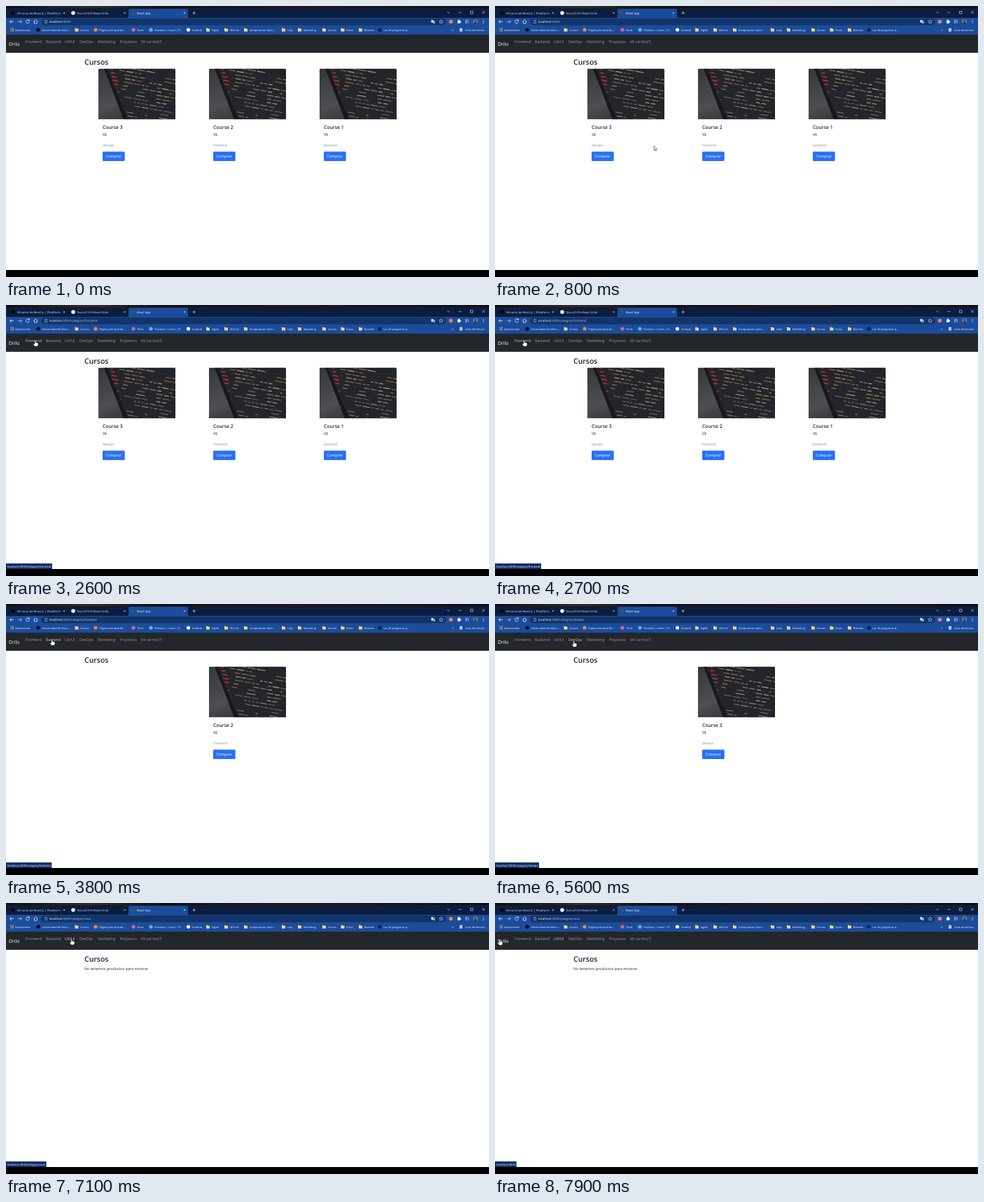
Write an HTML page that moves like this. It is 690 px wide and 388 px high and loops after 8000 ms.

```html
<!DOCTYPE html>
<html lang="es">
<head>
<meta charset="utf-8">
<title>React App</title>
<style>
  html, body { margin: 0; width: 100%; height: 100%; overflow: hidden; background: #fff; }
  svg { display: block; width: 690px; height: 388px; }
  text { font-family: "Open Sans", "Noto Sans", sans-serif; text-rendering: geometricPrecision; white-space: pre; }
</style>
</head>
<body>
<svg id="stage" viewBox="0 0 690 388" xmlns="http://www.w3.org/2000/svg"></svg>
<script>
const LOOP = 8000, STEP = 100;
const stage = document.getElementById('stage');

const rect = (x, y, w, h, fill, extra = '') =>
  `<rect x="${x}" y="${y}" width="${w}" height="${h}" fill="${fill}" ${extra}/>`;
const dot = (x, y, r, fill) => `<circle cx="${x}" cy="${y}" r="${r}" fill="${fill}"/>`;
const line = (d, color = '#e4ebf7', w = .8) =>
  `<path d="${d}" fill="none" stroke="${color}" stroke-width="${w}"/>`;
const text = (x, y, size, fill, str, extra = '') =>
  `<text x="${x}" y="${y}" font-size="${size}" fill="${fill}" ${extra}>${str}</text>`;
const cross = (x, y, r) =>
  line(`M${x - r} ${y - r}l${2 * r} ${2 * r}m0 ${-2 * r}l${-2 * r} ${2 * r}`, '#dfe6f2', .6);

// Blurred photo of code on a tilted screen, 110 x 73
function photo() {
  let seed = 7;
  const rnd = () => (seed = (seed * 16807) % 2147483647) / 2147483647;
  const tones = ['#8d8f92', '#a58e4d', '#b6b4ab', '#97713a', '#6f7277'];
  let code = '';
  for (let row = -5; row < 15; row++) {
    const y = row * 5.2, left = 17 + row * 1.9;
    code += rect(left, y, 3 + rnd() * 6, 1.6, '#c23a35');
    for (let x = left + 11 + rnd() * 9; x < 112; x += 2) {
      const w = 3 + rnd() * 10;
      if (rnd() < .74) code += rect(x, y, w, 1.2, tones[Math.floor(rnd() * tones.length)]);
      x += w;
    }
  }
  return `<g id="photo" clip-path="url(#crop)">
    ${rect(0, 0, 110, 73, 'url(#desk)')}
    <path d="M11 0H110V73H41Z" fill="#24242b"/>
    <path d="M8 0H12L42 73H36Z" fill="#17181c"/>
    <g clip-path="url(#screen)"><g transform="rotate(10 20 0)" opacity=".85">${code}</g></g>
  </g>`;
}

function browser() {
  const frame = rect(0, 0, 690, 17, '#0b1d3f') + rect(0, 0, 690, 3, 'url(#edge)') +
    `<path d="M173 17q2 0 2-2V6q0-2 2-2h81q2 0 2 2v9q0 2 2 2z" fill="#1b4c9b"/>` +
    rect(0, 17, 690, 24, '#1b4c9b') + rect(50, 18, 579, 9.4, '#123468', 'rx="4.7"');

  const tabs = dot(10, 10, 2.8, '#080808') + dot(96, 10, 2.8, '#f3f5f8') + dot(181.5, 10, 2.6, '#3d5366') +
    text(16, 11.7, 4.15, '#dce4f2', 'Mi curso de React Js | Plataform') +
    text(101, 11.7, 4.15, '#dce4f2', 'Tovru27/CH-React-Drilo') +
    text(187, 11.7, 4.15, '#fff', 'React App') +
    [83, 169.5, 255].map(x => cross(x, 10, 1.2)).join('') +
    line('M266.5 10h4.4m-2.2-2.2v4.4', '#dfe6f2', .65) +
    line('M630.5 8.5l1.7 1.6 1.7-1.6', '#dfe6f2', .6) + line('M646.5 9.3h4', '#dfe6f2', .6) +
    line('M663.5 7.5h3.5v3.5h-3.5z', '#dfe6f2', .6) + cross(682, 9.2, 1.8);

  const tools = line('M11 22.5H5.5m2.4-2.4l-2.4 2.4 2.4 2.4') +
    line('M17 22.5h5.5m-2.4-2.4l2.4 2.4-2.4 2.4', '#aebfdd') +
    line('M33 20.8a2.5 2.5 0 1 0 .4 2.4M33.4 19.4v2h-2') +
    line('M39.4 22.4l2.9-2.6 2.9 2.6M40.4 21.8v3.2h3.8v-3.2') +
    line('M55.8 20.4h2.6v4.2h-2.6z', '#b9c7df', .6) +
    rect(607.5, 20, 3, 3.8, '#dfe6f2') + rect(609.8, 21.2, 3, 3.8, '#8fa6cf') +
    line('M621.6 19.6l.8 1.9 2 .2-1.5 1.3.5 2-1.8-1.1-1.8 1.1.5-2-1.5-1.3 2-.2z', '#dfe6f2', .55) +
    dot(635.5, 22.4, 2.7, '#e8805c') +
    rect(645, 20.7, 4.1, 4.1, '#f2f5fa', 'rx=".5"') + dot(646.9, 20.5, 1, '#f2f5fa') + dot(649.3, 22.7, .9, '#f2f5fa') +
    line('M656 20.8h4.8m-4.8 1.7h3.2m-3.2 1.7h2.5M660.6 22v2.6', '#dfe6f2', .7) +
    dot(670.7, 22.4, 3.3, '#77838c') + dot(670.7, 21.4, 1.2, '#22262d') +
    '<path d="M668.5 24.8q2.2-3.8 4.4 0q-2.2 1.8-4.4 0" fill="#22262d"/>' +
    [20.5, 22.4, 24.3].map(y => dot(682, y, .55, '#fff')).join('');

  // [icon x, label, icon colour]; no colour means a folder
  const marks = [
    [46, 'Universidad de Moru...', '#0b0b10'], [101, 'Cursos'], [128, 'Página principal de...', '#e78b3c'],
    [182, 'Tivok', '#d9628a'], [207, 'Products | Learn | P...', '#55b5e8'], [260.5, 'Codnub', '#f3f5f8'],
    [288.5, 'Inglés'], [314.5, 'ADS.txt'], [342.5, 'Computacion Aplic...'], [396.5, 'ruby'],
    [419.5, 'Marketing'], [454.5, 'Cursos'], [481, 'Foros'], [506.5, 'Bocetos'],
    [534, 'Las 36 preguntas q...', '#10203e']
  ].map(([x, label, color]) =>
    (color ? dot(x, 34, 2.6, color)
      : `<path d="M${x - 2.5} 31.8h2l.7.8h2.3v3.8h-5z" fill="#f6d67a"/>`) +
    text(x + 5.2, 35.5, 3.85, '#edf2fb', label)).join('');

  let apps = '';
  for (let i = 0; i < 9; i++)
    apps += rect(6 + i % 3 * 1.8, 31.6 + Math.floor(i / 3) * 1.8, 1.2, 1.2, ['#e96a5c', '#7cc08a', '#e9c65c'][i % 3]);
  return frame + tabs + tools + apps + text(13, 35.5, 3.85, '#edf2fb', 'Aplicaciones') + marks +
    text(637, 35.5, 5, '#edf2fb', '»') + rect(648, 31.8, 4, 4.6, '#dfe6f2') +
    line('M648.8 33.2h2.4m-2.4 1.5h2.4', '#1b4c9b', .5) +
    text(656, 35.5, 3.95, '#edf2fb', 'Lista de lectura');
}

const links = [
  ['Frontend', 28, 'frontend'], ['Backend', 57, 'backend'], ['UX/UI', 84, 'uiux'], ['DevOps', 105, 'devops'],
  ['Marketing', 131, 'marketing'], ['Proyectos', 162.5, 'proyectos'], ['Mi carrito(?)', 193, 'cart']
];

const card = (x, title, kind, id) => `<g id="${id}" transform="translate(${x} 89.5)">
  <use href="#photo"/>
  ${text(6, 86, 6.8, '#212529', title, 'font-weight="600"')}
  ${text(6, 96.3, 5.3, '#212529', '9$')}
  ${text(6, 111, 4.8, '#85898d', kind)}
  ${rect(6, 119, 31.7, 13.6, '#2970f6', 'rx="1.4"')}
  ${text(10.6, 127.8, 5.45, '#fff', 'Comprar')}</g>`;

stage.innerHTML = `<defs>
    <clipPath id="crop"><path d="M0 73V1.2Q0 0 1.2 0H108.8Q110 0 110 1.2V73Z"/></clipPath>
    <clipPath id="screen"><path d="M13 0H110V73H43Z"/></clipPath>
    <linearGradient id="desk" x2=".6" y2="1"><stop stop-color="#35373b"/><stop offset=".6" stop-color="#4c4e52"/><stop offset="1" stop-color="#2b2d31"/></linearGradient>
    <linearGradient id="edge"><stop stop-color="#120d0c"/><stop offset=".18" stop-color="#3a2a1c"/><stop offset=".32" stop-color="#15100f"/><stop offset=".6" stop-color="#2b1413"/><stop offset="1" stop-color="#140f10"/></linearGradient>
    <linearGradient id="bar" x2="0" y2="1"><stop stop-color="#212529"/><stop offset="1" stop-color="#25292d"/></linearGradient>
    ${photo()}
  </defs>
  ${rect(0, 0, 690, 388, '#fff')}${browser()}
  <text x="62" y="24.2" font-size="4.4" fill="#fff">localhost<tspan id="path" fill="#b4c3de"></tspan></text>
  ${rect(0, 41, 690, 26, 'url(#bar)')}
  ${text(4, 57, 6.9, '#fff', 'Drilo')}
  ${links.map(([label, x], i) => text(x, 53, 5.4, '#9b9ea1', label, `id="link${i}"`)).join('')}
  ${text(112, 84, 10.5, '#212529', 'Cursos', 'font-weight="600"')}
  ${card(132, 'Course 3', 'devops', 'left')}
  ${card(290, 'Course 2', 'frontend', 'mid')}
  ${card(448, 'Course 1', 'backend', 'right')}
  ${text(112, 95.6, 5.35, '#212529', 'No tenemos productos para mostrar', 'id="none"')}
  <g id="status">${rect(0, 370, 67, 8, '#12306a', 'id="bubble"')}${text(2, 375.5, 4, '#f2f5fb', '', 'id="tip"')}</g>
  ${rect(0, 378, 690, 10, '#000')}
  <path id="arrow" d="M0 0V6.2L1.5 4.9L2.5 7.1L3.5 6.6L2.5 4.6H4.5Z" fill="#fff" stroke="#000" stroke-width=".5"/>
  <path id="hand" d="M-.8.7Q0-.5.8.7V3.1Q1.7 2.6 2.2 3.4Q3.2 3 3.5 3.9Q4.5 3.7 4.5 4.8V6.3L3.5 8.7H-.6L-2.8 5.4Q-2.7 4.3-1.7 4.8L-.8 5.6Z" fill="#fff" stroke="#000" stroke-width=".5"/>`;

const $ = id => document.getElementById(id);
const show = (id, on) => $(id).setAttribute('visibility', on ? 'visible' : 'hidden');
const spans = links.map(([, x], i) => [x - 2.8, x + $('link' + i).getComputedTextLength() + 2.8]);

// Pointer tip: [time, x, y]
const path = [
  [700, 240, 213], [1000, 190, 164], [1400, 72, 67], [1600, 64, 62], [1800, 54, 59], [2100, 41.5, 50.5],
  [3000, 41.5, 50.5], [3400, 65.5, 50.5], [4600, 65.5, 50.5], [5000, 112.5, 52.8], [5700, 112.5, 52.8],
  [6100, 93.5, 51.2], [7400, 93.5, 51.2], [7700, 6.5, 51.8], [8000, 6.5, 51.8]
];
const clicks = [[0, -1], [2400, 0], [3500, 1], [5100, 3], [6500, 2]];
const pages = [[0, 'all'], [3000, 2], [3900, 1], [5500, 3], [6800, 'empty']];
const kinds = { 1: 'backend', 2: 'frontend', 3: 'devops' };
const at = (table, t) => table.filter(row => row[0] <= t).pop()[1];

function pointer(t) {
  const i = path.findIndex(p => p[0] > t);
  if (i < 1) return null;
  const [t0, x0, y0] = path[i - 1], [t1, x1, y1] = path[i];
  const u = (t - t0) / (t1 - t0), k = u * u * (3 - 2 * u);
  return [x0 + (x1 - x0) * k, y0 + (y1 - y0) * k];
}

function draw(t) {
  const pos = pointer(t), focus = at(clicks, t), page = at(pages, t);
  const inBar = pos && pos[1] < 57.5;
  const hover = inBar ? spans.findIndex(([a, b]) => pos[0] >= a && pos[0] < b) : -1;
  const brand = inBar && pos[0] < 21;
  const over = hover >= 0 || brand;

  $('path').textContent = ':3000/' + (focus < 0 ? '' : 'category/' + links[focus][2]);
  links.forEach((_, i) => $('link' + i).setAttribute('fill', i === hover || i === focus ? '#ced0d2' : '#9b9ea1'));

  show('left', page === 'all');
  show('right', page === 'all');
  show('mid', page !== 'empty');
  show('none', page === 'empty');
  const n = kinds[page] ? page : 2, words = $('mid').querySelectorAll('text');
  words[0].textContent = 'Course ' + n;
  words[2].textContent = kinds[n];

  show('status', over);
  show('bubble', over);
  if (over) {
    $('tip').textContent = 'localhost:3000' + (brand ? '' : '/category/' + links[hover][2]);
    $('bubble').setAttribute('width', $('tip').getComputedTextLength() + 3.6);
  }
  show('arrow', pos && !over);
  show('hand', pos && over);
  if (pos) ['arrow', 'hand'].forEach(id => $(id).setAttribute('transform', `translate(${pos[0]} ${pos[1]})`));
}

const start = performance.now();
function tick() {
  const t = (performance.now() - start) % LOOP;
  draw(Math.floor(t / STEP) * STEP);
  requestAnimationFrame(tick);
}
tick();
</script>
</body>
</html>
```
